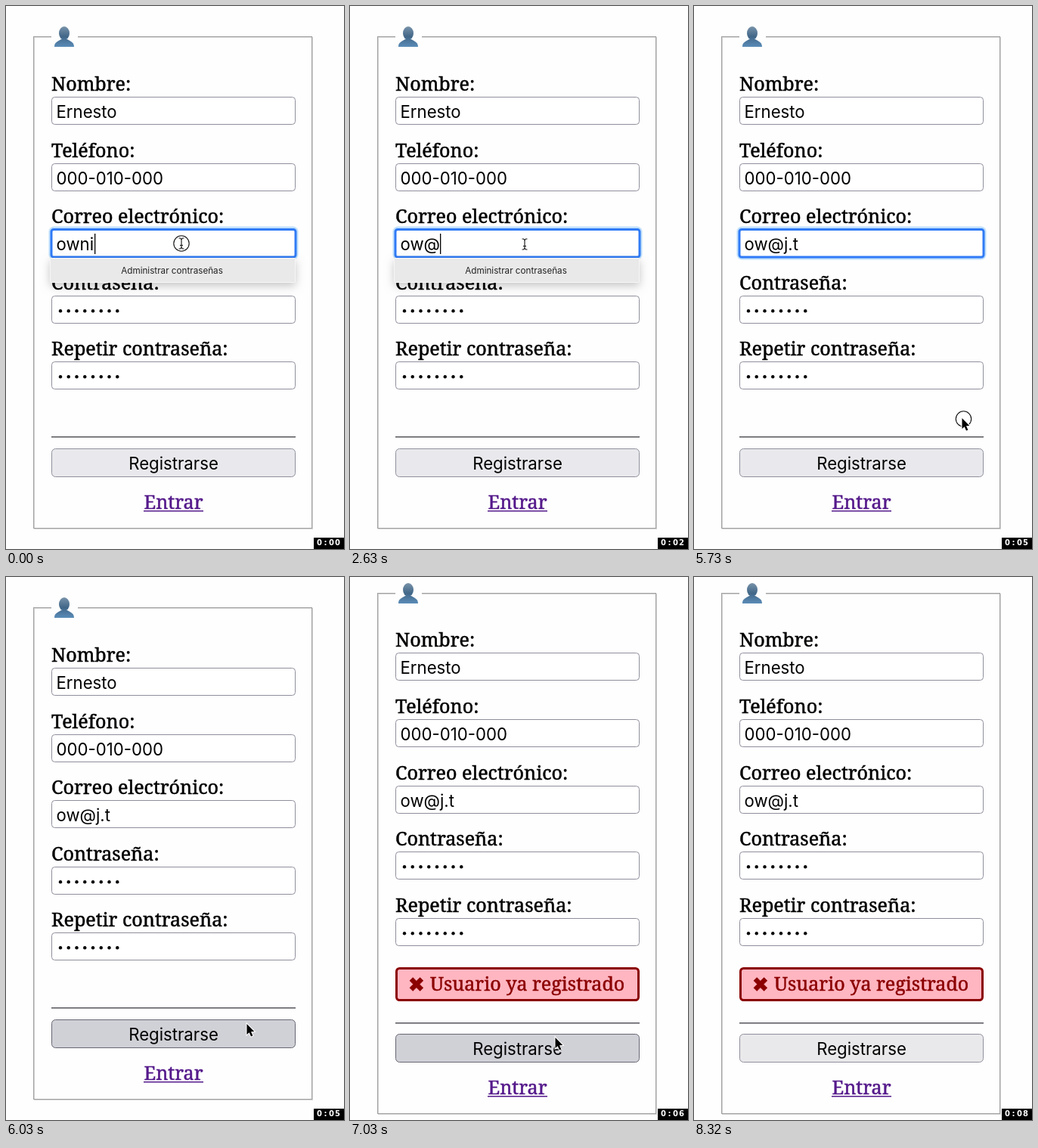
These frames come from a looping animation (447 by 718 pixels, 8920 ms). An HTML page with a canvas:

```html
<!DOCTYPE html>
<html lang="es">
<head>
<meta charset="utf-8">
<title>Registro</title>
<style>
html, body { margin: 0; width: 100%; height: 100%; overflow: hidden; background: #fefefe; }
canvas { display: block; }
</style>
</head>
<body>
<canvas id="stage" width="447" height="718"></canvas>
<script>
const ctx = document.getElementById('stage').getContext('2d');
const LOOP = 8920;
const SERIF = '25.1px "Noto Serif", serif';
const SANS = '22.2px Inter, sans-serif';
const LEFT = 60, WIDTH = 323, PITCH = 87.6;

// [start, text, caret visible]
const typing = [
  [0, 'owni', 1], [290, 'owni', 0], [890, 'owni', 1], [1290, 'own', 1],
  [1440, 'ow', 1], [1580, 'ow', 0], [2030, 'ow', 1], [2630, 'ow@', 1],
  [2930, 'ow@', 0], [3380, 'ow@j', 1], [3830, 'ow@j.', 1], [4430, 'ow@j.t', 0]
];

// [start, x, y, shape, click ring]
const pointer = [
  [0, 232, 314, 'beam', 1], [150, 231, 315, 'beam', 0],
  [5030, 240, 345, 'arrow', 0], [5180, 265, 400, 'arrow', 0],
  [5330, 300, 465, 'arrow', 0], [5430, 335, 525, 'arrow', 0],
  [5580, 354, 546, 'arrow', 0], [5730, 354, 546, 'arrow', 1],
  [5880, 350, 553, 'arrow', 0], [6030, 318, 592, 'arrow', 0],
  [6130, 285, 606, 'arrow', 0], [6280, 271, 610, 'arrow', 0],
  [6730, 271, 610, 'arrow', 1], [6880, 271, 610, 'arrow', 0],
  [7330, 258, 586, 'arrow', 0], [7480, 236, 560, 'arrow', 0],
  [7630, 216, 545, 'arrow', 0], [7780, 202, 535, 'arrow', 0],
  [7930, 188, 526, 'arrow', 0], [8080, 180, 521, 'arrow', 0],
  [8220, 177, 519, 'arrow', 0], [8320, 0, 0, 'none', 0]
];

// [start, fill, border]
const buttonLook = [
  [0, '#e9e9ed', '#8f8f9d'], [6030, '#d0d0d7', '#676774'], [6730, '#b1b1b9', '#484851'],
  [6880, '#d0d0d7', '#676774'], [7330, '#e9e9eb', '#8f8f9d']
];
const seconds = [0, 990, 2030, 2930, 3980, 5030, 6130, 7180, 8080];

const at = (keys, t) => keys.filter(k => k[0] <= t).pop();

function text(str, x, y, font, color = '#000', align = 'left', weight = 0) {
  ctx.font = font;
  ctx.fillStyle = color;
  ctx.textAlign = align;
  ctx.fillText(str, x, y);
  if (weight) {
    ctx.strokeStyle = color;
    ctx.lineWidth = weight;
    ctx.strokeText(str, x, y);
  }
}

const serif = (str, x, y, color, align) => text(str, x, y, SERIF, color, align, 0.5);

function box(x, y, w, h, r, fill, stroke, line = 1) {
  ctx.beginPath();
  ctx.roundRect(x, y, w, h, r);
  if (fill) { ctx.fillStyle = fill; ctx.fill(); }
  if (stroke) { ctx.strokeStyle = stroke; ctx.lineWidth = line; ctx.stroke(); }
}

function disc(x, y, r) {
  ctx.beginPath();
  ctx.arc(x, y, r, 0, 7);
}

function person(y) {
  const g = ctx.createLinearGradient(0, y - 14, 0, y + 13);
  g.addColorStop(0, '#7893aa');
  g.addColorStop(0.5, '#426788');
  g.addColorStop(1, '#5a8cb8');
  ctx.fillStyle = g;
  ctx.beginPath();
  ctx.ellipse(77, y - 5, 7, 9, 0, 0, 7);
  ctx.fill();
  ctx.beginPath();
  ctx.moveTo(64, y + 13);
  ctx.bezierCurveTo(64, y + 7, 68, y + 6, 73, y + 3);
  ctx.lineTo(81, y + 3);
  ctx.bezierCurveTo(86, y + 6, 90, y + 7, 90, y + 13);
  ctx.closePath();
  ctx.fill();
}

function frame(top, bottom) {
  ctx.lineWidth = 1;
  ctx.strokeStyle = '#d2d2d2';
  ctx.strokeRect(37.5, top + 1.5, 368, bottom - top - 2);
  ctx.strokeStyle = '#a2a2a2';
  ctx.strokeRect(36.5, top + 0.5, 368, bottom - top - 2);
  ctx.fillStyle = '#fefefe';
  ctx.fillRect(60, top - 3, 35, 8);
  person(top + 1);
}

function field(i, label, value, shift, focused) {
  const y = Math.round(120 + i * PITCH + shift);
  serif(label, LEFT, y - 8);
  if (focused) {
    box(56.5, y - 3.5, 330, 44, 7, '#bfe0fb');
    box(60, y + 0.5, WIDTH, 36.5, 3, '#fff', '#307bf6', 3);
  } else {
    box(60.5, y + 0.5, WIDTH - 1, 36, 4, '#fff', '#8f8f9d');
  }
  if (value) {
    text(value, 66.5, y + 28, SANS);
    return;
  }
  ctx.fillStyle = '#000';
  for (let k = 0; k < 8; k++) {
    disc(72 + k * 10.75, y + 20.3, 2.2);
    ctx.fill();
  }
}

function popup() {
  ctx.save();
  ctx.shadowColor = 'rgba(0,0,0,.22)';
  ctx.shadowBlur = 12;
  ctx.shadowOffsetY = 4;
  box(58, 333, 325, 33, 1, '#ebebec');
  ctx.restore();
  box(58.5, 333.5, 324, 32, 1, '#e9e9ea', '#f6f6f6');
  text('Administrar contraseñas', 219.5, 354, '11.7px Inter, sans-serif', '#222', 'center');
}

function message() {
  box(61.5, 517.5, WIDTH - 3, 42, 4, '#ffb6c1', '#8b0000', 3);
  text('✖', 77, 548, '26px "DejaVu Sans", sans-serif', '#8b0000', 'left', 0.8);
  serif('Usuario ya registrado', 106, 547, '#8b0000');
}

function footer(shift, [, fill, border]) {
  const down = Math.floor(shift);
  ctx.fillStyle = '#606066';
  ctx.fillRect(LEFT, Math.round(569 + shift), WIDTH, 1.6);
  box(60.5, 585.5 + down, WIDTH - 1, 37, 5, fill, border);
  text('Registrarse', 221.5, 613 + down, SANS, '#000', 'center');
  serif('Entrar', 221.5, 665 + down, '#551a8b', 'center');
  ctx.fillRect(182, 667 + down, 79, 1.5);
}

function path(points) {
  ctx.beginPath();
  points.forEach(([x, y]) => ctx.lineTo(x, y));
}

function drawPointer([, x, y, shape, ring]) {
  if (shape === 'none') return;
  if (ring) {
    disc(shape === 'beam' ? x : x + 2.5, y, 10.2);
    ctx.lineWidth = 1.1;
    ctx.strokeStyle = '#111';
    ctx.stroke();
  }
  ctx.save();
  ctx.translate(x, y);
  if (shape === 'beam') {
    ctx.strokeStyle = '#222';
    ctx.lineWidth = 1.2;
    for (const s of [-1, 1]) {
      path([[-3.5, 7 * s], [-1.5, 7 * s], [0, 5.5 * s], [1.5, 7 * s], [3.5, 7 * s]]);
      ctx.stroke();
    }
    path([[0, -6], [0, 6]]);
    ctx.stroke();
    path([[-2, 2.5], [2, 2.5]]);
    ctx.stroke();
  } else {
    path([[0.5, -1], [0.5, 13], [3.7, 10.2], [6, 15.5], [8.4, 14.5], [6, 9.3], [10.3, 9]]);
    ctx.closePath();
    ctx.strokeStyle = '#fff';
    ctx.lineWidth = 2;
    ctx.stroke();
    ctx.fillStyle = '#000';
    ctx.fill();
  }
  ctx.restore();
}

function timer(t) {
  const s = seconds.filter(v => v <= t).length - 1;
  ctx.fillStyle = '#000';
  ctx.fillRect(407, 703, 40, 15);
  [...`0:0${s}`].forEach((c, i) =>
    text(c, 414.5 + i * 8, 713, 'bold 10px "DejaVu Sans", sans-serif', '#fff', 'center'));
}

function draw(t) {
  const [, email, caret] = at(typing, t);
  const failed = t >= 7030;
  const shift = failed ? 19.6 : 0;

  ctx.fillStyle = '#fefefe';
  ctx.fillRect(0, 0, 447, 718);
  frame(failed ? 21 : 40, failed ? 711 : 692);
  field(0, 'Nombre:', 'Ernesto', -shift);
  field(1, 'Teléfono:', '000-010-000', -shift);
  field(3, 'Contraseña:', '', -shift);
  field(4, 'Repetir contraseña:', '', -shift);
  field(2, 'Correo electrónico:', email, -shift, t < 5880);
  if (caret) {
    ctx.font = SANS;
    const x = Math.round(67 + ctx.measureText(email).width);
    ctx.fillStyle = '#000';
    ctx.fillRect(x, 301, 1.3, 27);
  }
  if (t < 5730) popup();
  if (failed) message();
  footer(shift, at(buttonLook, t));
  drawPointer(at(pointer, t));
  timer(t);
}

const start = performance.now();
function tick() {
  draw((performance.now() - start) % LOOP);
  requestAnimationFrame(tick);
}
tick();
</script>
</body>
</html>
```
